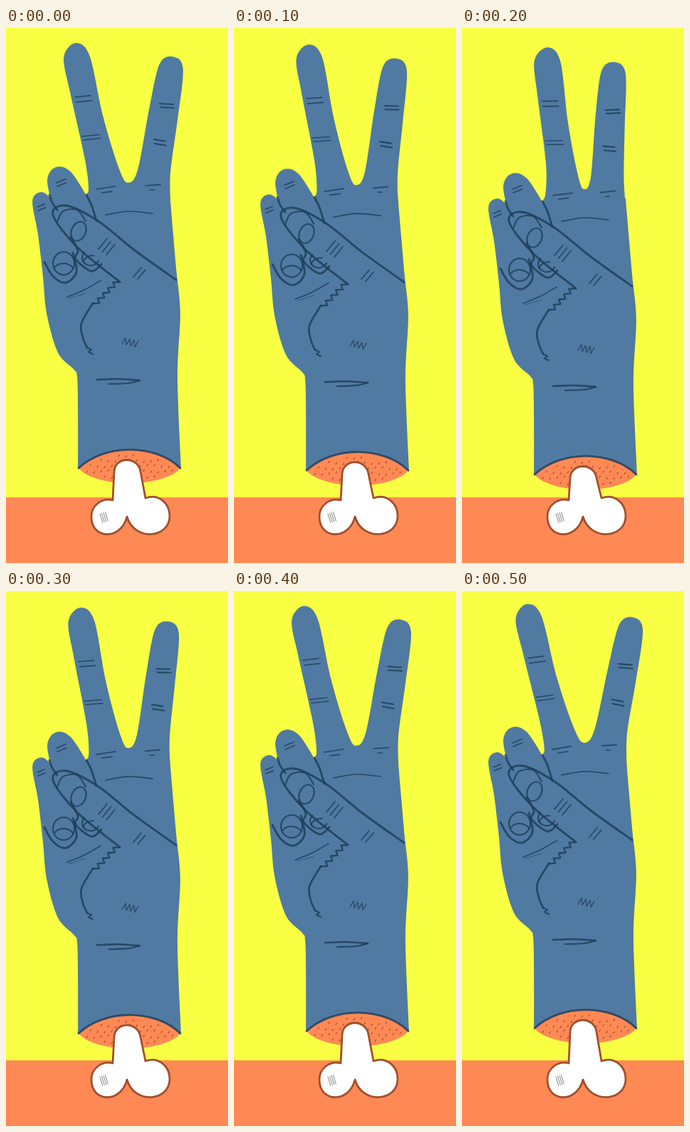
An HTML page with a canvas that plays this animation: 312 px wide and 750 px high, repeating every 0.6 s.

```html
<!DOCTYPE html>
<html lang="en">
<head>
<meta charset="utf-8">
<title>Peace hand</title>
<style>
  html, body { margin: 0; width: 100%; height: 100%; overflow: hidden; background: #f9ff43; }
  canvas { display: block; }
</style>
</head>
<body>
<canvas id="stage" width="312" height="750"></canvas>
<script>
const ctx = document.getElementById('stage').getContext('2d');
const YELLOW = '#f9ff43', ORANGE = '#ff8955', BLUE = '#507aa2', INK = 'rgba(30,62,88,.82)', BROWN = '#a0502f';

// Each pose: vertical shift of the hand, inward swing of the raised fingers in degrees
const open = [-4, -1.5], rest = [0, 0], near = [3.2, 1.7], shut = [9, 5.4];
const poses = [rest, near, shut, near, rest, open];

const parse = s => s.split(' ').map(p => p.split(',').map(Number));
const same = p => p;

// Key points of the silhouette
const RAISED = parse('125,262 113,238 117,226 112,185 91,90 82,42 98,22 117,40 135,122 159,200 172,218 ' +
  '186,199 202,114 216,52 234,41 248,58 240,130 230,205 231,262');
const RING = parse('66,250 59,213 70,196 90,202 113,237 125,262');
const LEFT = parse('102,617 102,540 101,490 96,478 74,455 58,400 53,350 46,290 38,243 50,231 63,240');
const RIGHT = parse('229,230 238,335 244,400 240,488 245,617');

// Smooth curve through points, continuing the current path
function spline(pts, join) {
  const at = i => pts[Math.max(0, Math.min(pts.length - 1, i))];
  join ? ctx.lineTo(...pts[0]) : ctx.moveTo(...pts[0]);
  for (let i = 0; i < pts.length - 1; i++) {
    const [a, b, c, d] = [at(i - 1), at(i), at(i + 1), at(i + 2)];
    ctx.bezierCurveTo(b[0] + (c[0] - a[0]) / 6, b[1] + (c[1] - a[1]) / 6,
      c[0] - (d[0] - b[0]) / 6, c[1] - (d[1] - b[1]) / 6, ...c);
  }
}

function stroke(width, color = INK) {
  ctx.lineWidth = width;
  ctx.strokeStyle = color;
  ctx.stroke();
}

function fill(color) {
  ctx.fillStyle = color;
  ctx.fill();
}

function skin(...lines) {
  ctx.beginPath();
  lines.forEach((pts, i) => spline(pts, i > 0));
  fill(BLUE);
  stroke(1.8, BLUE);
}

function ink(points, width = 2.9) {
  ctx.beginPath();
  spline(parse(points));
  stroke(width);
}

function oval(x, y, rx, ry, tilt = 0, from = 0, to = 7) {
  ctx.beginPath();
  ctx.ellipse(x, y, rx, ry, tilt, from, Math.min(to, Math.PI * 2));
  stroke(2.1);
}

// Parallel pencil strokes, each one moved by (gx, gy)
function creases(x, y, length, degrees, count, gx, gy, width = 1.7, map = same, color = INK) {
  const a = degrees * Math.PI / 180;
  ctx.beginPath();
  for (let i = 0; i < count; i++) {
    const point = k => map([x + gx * i + k * length * Math.cos(a), y + gy * i + k * length * Math.sin(a)]);
    ctx.moveTo(...point(0));
    ctx.lineTo(...point(1));
  }
  stroke(width, color);
}

// Steps of (dx, dy), every second point pushed out by (ox, oy)
function zigzag(x, y, count, dx, dy, ox, oy, width) {
  ctx.beginPath();
  for (let i = 0; i < count; i++) ctx.lineTo(x + dx * i + i % 2 * ox, y + dy * i + i % 2 * oy);
  stroke(width);
}

// Swings a point of the raised fingers towards the middle, fading out at the knuckles
const swing = degrees => ([x, y]) => {
  const side = Math.sign(172 - x);
  const weight = Math.max(0, Math.min(1, (245 - y) / 60));
  const a = side * weight * degrees * Math.PI / 180;
  const px = side > 0 ? 140 : 210, py = 258, dx = x - px, dy = y - py;
  return [px + dx * Math.cos(a) - dy * Math.sin(a), py + dx * Math.sin(a) + dy * Math.cos(a)];
};

function cutEdge() {
  ctx.bezierCurveTo(210, 583, 140, 582, 102, 617);
}

function drawWound() {
  ctx.beginPath();
  ctx.moveTo(102, 617);
  ctx.bezierCurveTo(125, 645, 222, 645, 245, 617);
  cutEdge();
  fill(ORANGE);
  ctx.beginPath();
  for (let row = 0; row < 5; row++) {
    for (let x = 108 + row % 2 * 5; x < 240; x += 10) {
      const y = 599 + row * 7.5 + Math.sin(x * 3 + row) * 1.5;
      const bend = ((x - 173) / 72) ** 2;
      if (y < 598 + 22 * bend || y > 634 - 17 * bend) continue;
      ctx.moveTo(x, y + 1);
      ctx.lineTo(x + 1.5, y - 1);
    }
  }
  stroke(1.2, BROWN);
}

function drawFingerLines(move) {
  creases(97, 97, 22, -6, 2, 2, 7, 1.7, move);
  creases(107, 152, 24, -6, 2, 2, 5, 1.5, move);
  creases(216, 106, 19, 3, 2, 1, 5, 2.2, move);
  creases(208, 156, 16, 10, 2, 1, 6, 2.2, move);
  creases(127, 226, 27, -9, 1, 0, 0, 1.7, move);
  creases(135, 231, 14, -8, 1, 0, 0, 1.7, move);
  creases(196, 221, 21, -4, 1, 0, 0, 1.7, move);
  creases(202, 227, 6, 0, 1, 0, 0, 1.7, move);
}

function drawPalmLines() {
  creases(71, 217, 14, -22, 2, 1, 5);
  creases(44, 251, 11, -22, 2, 1, 5);
  creases(130, 310, 19, -51, 3, 5.5, 4);
  creases(179, 349, 17, -50, 2, 6, 3);
  creases(89, 379, 24, -17, 1, 0, 0, .7);
  ink('140,262 172,257 206,260', 1.7);
  ink('86,377 110,367 133,354', 1.6);
  ink('128,493 158,492 188,494', 2.6);
  ink('188,494 172,498 145,499', 2.2);
}

function drawFoldedFingers() {
  ink('61,234 65,245 72,255');
  ink('113,234 120,248 127,270');
  ink('239,353 180,311 130,271 85,249 66,262 100,307 160,356');
  ink('72,272 80,257 100,255 112,271', 2.1);
  oval(102, 285, 10, 14, .4);
  ink('54,328 66,348 84,357 99,342 94,315');
  oval(81, 330, 15, 16);
  oval(81, 342, 15, 12, 0, 3.7, 5.8);
  ink('91,293 101,312 98,324 120,341 134,331');
  oval(119, 322, 12, 11, 0, .4, 3.9);
  oval(121, 331, 13, 12, 0, 3.4, 4.9);
}

function drawThumbBase() {
  zigzag(160, 356, 10, -3.6, 3.7, -6, -3, 2.4);
  ink('122,386 106,414 108,434 114,448', 2.7);
  zigzag(114, 448, 4, 1, 3, 5, 0, 2.2);
  zigzag(163, 443, 8, 3, .7, 2, -9, 1.3);
}

function drawHand(degrees) {
  const move = swing(degrees);
  skin(RAISED.map(move));
  skin(RING);
  ctx.save();
  ctx.beginPath();
  ctx.rect(0, 0, 312, 617);
  ctx.clip();
  skin(LEFT, RIGHT);
  ctx.restore();
  drawWound();
  ctx.beginPath();
  ctx.moveTo(245, 617);
  cutEdge();
  stroke(2.9);
  drawFingerLines(move);
  drawPalmLines();
  drawFoldedFingers();
  drawThumbBase();
}

// The knobs stay put while the top of the shaft follows the hand
function drawBone(dy) {
  ctx.beginPath();
  ctx.moveTo(150, 662);
  ctx.lineTo(152, 622 + dy);
  ctx.bezierCurveTo(153, 600 + dy, 186, 600 + dy, 189, 622 + dy);
  ctx.lineTo(196, 659);
  ctx.bezierCurveTo(214, 652, 230, 666, 230, 684);
  ctx.bezierCurveTo(230, 716, 180, 720, 170, 685);
  ctx.bezierCurveTo(162, 718, 120, 718, 120, 685);
  ctx.bezierCurveTo(120, 669, 135, 658, 150, 662);
  ctx.closePath();
  fill('#fff');
  stroke(2.8, BROWN);
  creases(132, 681, 13, 73, 4, 2.5, -.8, .9, same, '#777');
}

function draw([dy, degrees]) {
  ctx.fillStyle = YELLOW;
  ctx.fillRect(0, 0, 312, 750);
  ctx.fillStyle = ORANGE;
  ctx.fillRect(0, 658, 312, 92);
  ctx.save();
  ctx.translate(0, dy);
  drawHand(degrees);
  ctx.restore();
  drawBone(dy);
}

ctx.lineCap = ctx.lineJoin = 'round';
const start = performance.now();
function tick() {
  const t = Math.max(0, performance.now() - start);
  draw(poses[Math.floor(t / 100) % poses.length]);
  requestAnimationFrame(tick);
}
tick();
</script>
</body>
</html>
```
